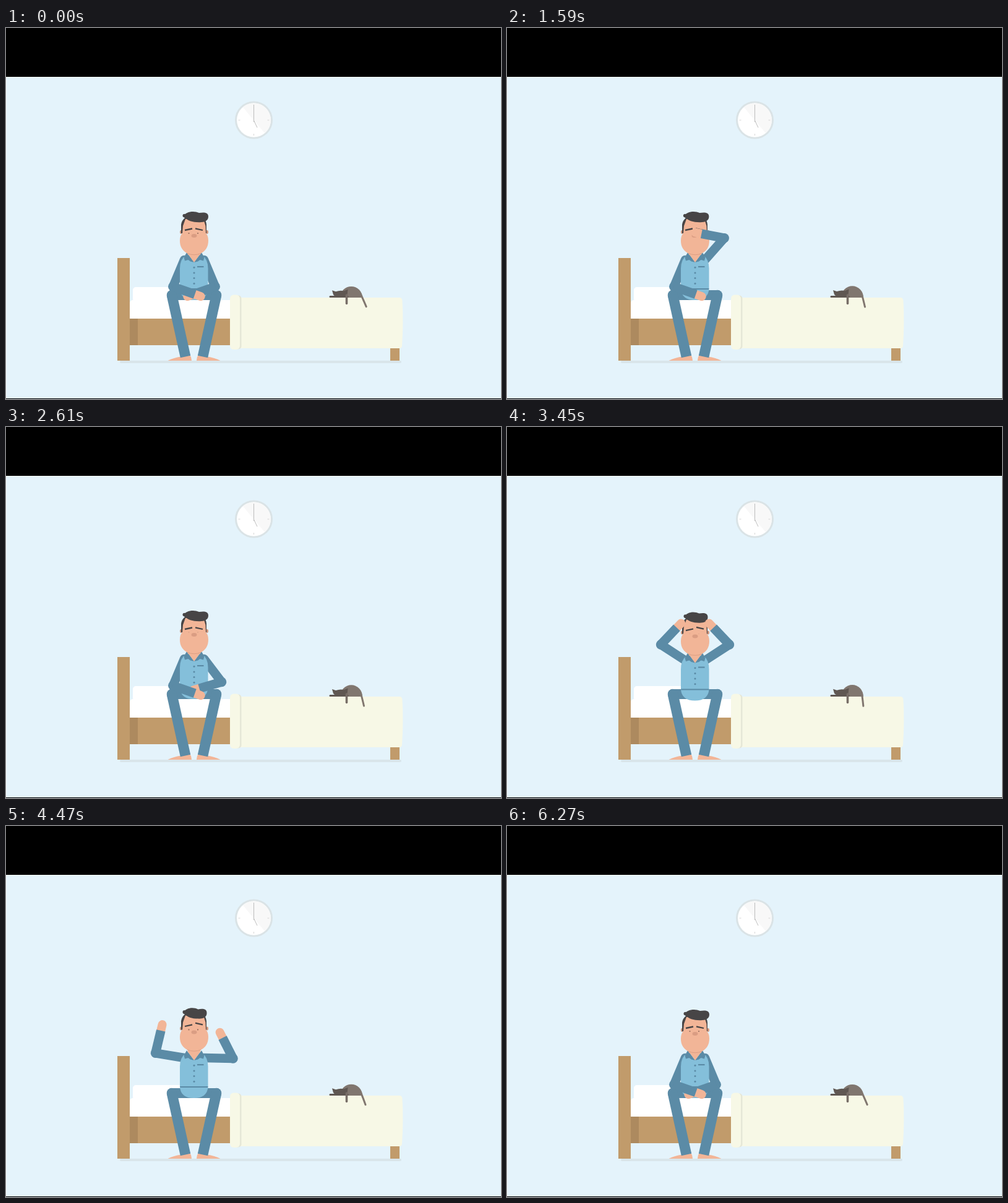
Write an HTML page with a canvas that moves like this. It is 800 by 600 pixels and loops after 6300 ms.

```html
<!DOCTYPE html>
<html lang="en">
<head>
<meta charset="utf-8">
<title>Bedtime</title>
<style>
html, body { margin: 0; width: 100%; height: 100%; overflow: hidden; background: #000; }
canvas { display: block; }
</style>
</head>
<body>
<canvas id="stage" width="800" height="600"></canvas>
<script>
const ctx = document.getElementById('stage').getContext('2d');
const LOOP = 6300, TAU = Math.PI * 2, AXIS = 304;
const NAVY = '#5b8ba6', SHIRT = '#84bfda', SKIN = '#f2b597', HAIR = '#474546';
const WOOD = '#c19b6b', SHEET = '#f7f8e6', CAT = '#80766f', CAT_DARK = '#5f5752';

// poses: upper arm and forearm angles in degrees, for the arm on the left
const REST = [112.7, 19.4], RUB = [232, -8], HOLD = [213, -46.5], STRETCH = [240, -140];

const rightArm = [[30, REST], [600, RUB], [2050, RUB], [2768, REST], [2800, REST],
  [3300, HOLD], [3650, HOLD], [4000, STRETCH], [4074, STRETCH], [4888, REST]];
const leftArm = [[2800, REST], [3300, HOLD], [3680, HOLD], [4040, STRETCH],
  [4120, STRETCH], [4934, REST]];
const rubbing = [[450, [0]], [700, [1]], [2000, [1]], [2300, [0]]];
const bodyDrop = [[2800, [0]], [3350, [2.5]], [3650, [2.5]], [4100, [0]]];
const headDrop = [[2800, [0]], [3350, [2.6]], [3650, [2.6]], [4050, [-2.6]],
  [4470, [-2.6]], [5000, [0]]];
const browLift = [[2800, [0]], [3350, [2]], [4500, [2]], [5050, [0]]];
const eyeOpen = [[60, [1]], [250, [0]], [3350, [0.15]], [3700, [0.15]], [4250, [1]],
  [5480, [1]], [5580, [0]], [5640, [0]], [5760, [1]]];

function track(keys, t) {
  if (t <= keys[0][0]) return keys[0][1];
  for (let i = 1; i < keys.length; i++) {
    const [t0, a] = keys[i - 1], [t1, b] = keys[i];
    if (t < t1) {
      const u = (t - t0) / (t1 - t0), e = u * u * (3 - 2 * u);
      return a.map((v, k) => v + (b[k] - v) * e);
    }
  }
  return keys[keys.length - 1][1];
}

function rect(x, y, w, h, color, r = 0) {
  ctx.fillStyle = color;
  ctx.beginPath();
  ctx.roundRect(x, y, w, h, r);
  ctx.fill();
}

function ellipse(x, y, rx, ry, color) {
  ctx.fillStyle = color;
  ctx.beginPath();
  ctx.ellipse(x, y, rx, ry, 0, 0, TAU);
  ctx.fill();
}

function line(x0, y0, x1, y1, width, color, cap = 'butt') {
  ctx.strokeStyle = color;
  ctx.lineWidth = width;
  ctx.lineCap = cap;
  ctx.beginPath();
  ctx.moveTo(x0, y0);
  ctx.lineTo(x1, y1);
  ctx.stroke();
}

function shape(d, color) {
  ctx.fillStyle = color;
  ctx.fill(new Path2D(d));
}

function mirrored(draw) {
  ctx.save();
  ctx.translate(2 * AXIS, 0);
  ctx.scale(-1, 1);
  draw();
  ctx.restore();
}

function both(draw) {
  draw();
  mirrored(draw);
}

function drawClock() {
  const x = 400.5, y = 149;
  ellipse(x, y, 30.5, 30.5, '#dae3e6');
  ellipse(x, y, 27.5, 27.5, '#ffffff');
  ctx.fillStyle = '#f8f8f8';
  ctx.beginPath();
  ctx.arc(x, y, 27.5, -2.27, 0.87);
  ctx.fill();
  for (let i = 0; i < 4; i++) {
    const c = Math.cos(i * TAU / 4), s = Math.sin(i * TAU / 4);
    line(x + c * 22, y + s * 22, x + c * 25, y + s * 25, 1, '#d6d6d6');
  }
  line(x, 152, x, 124, 1, '#bdbdbd');
  line(x, 149.5, 406, 161, 1, '#bdbdbd');
}

function drawRoom() {
  rect(0, 0, 800, 600, '#000');
  rect(0, 79, 800, 520, '#f6fbfe');
  rect(1, 80, 799, 519, '#e4f3fb');
  drawClock();
  rect(184, 538, 455, 4, '#d9e5ea', 2);
  rect(205, 419, 90, 24, '#fff', 5);
  rect(200, 440, 170, 32, '#fff', [5, 0, 0, 0]);
  rect(200, 470, 164, 43, WOOD);
  rect(200, 470, 13, 43, '#ad8a5f');
  rect(180, 372, 20, 166, WOOD);
  rect(621, 516, 15, 22, WOOD);
  shape('M366 436H636Q640 436 640.5 441Q642.5 476 640 514Q639.5 518 636 518H366Z', SHEET);
  rect(366, 432.5, 14.5, 87, '#e5e7d7', 5);
  rect(362, 431.5, 16, 88.5, SHEET, 6);
}

function drawCat(t) {
  const wave = Math.cos(t * TAU / 2100), top = 18.7 - wave * 0.6;
  const tip = 578.3 + 3.9 * wave;
  ctx.strokeStyle = CAT;
  ctx.lineWidth = 3;
  ctx.lineCap = 'round';
  ctx.beginPath();
  ctx.moveTo(573, 430);
  ctx.quadraticCurveTo(574.5 + wave * 0.6, 434, tip, 451 - wave * 0.4);
  ctx.stroke();
  ctx.fillStyle = CAT;
  ctx.beginPath();
  ctx.ellipse(558, 436, 18, top, 0, Math.PI, TAU);
  ctx.fill();
  line(524, 434.6, 552, 434.6, 3, CAT_DARK, 'round');
  const dy = wave * 0.3;
  ctx.save();
  ctx.translate(0, dy);
  shape('M527 424L533 426Q540 423.5 546 425L552.5 422.5L551.5 432Q547 435 540 435Q531 434 529 431Z', CAT_DARK);
  ctx.restore();
  line(550.5, 432, 550.5, 445.5, 3.6, '#776d67', 'round');
}

function drawLegs() {
  line(268, 432, 340, 432, 16, NAVY, 'round');
  both(() => {
    shape('M261.5 538Q271 533 283 531.5L297.5 529Q300 533 300 538Z', SKIN);
    ellipse(268, 432, 8.3, 8.3, NAVY);
    line(268, 432, 290, 531.5, 16.8, NAVY);
  });
}

function joints(pose, dy) {
  const [a, b] = pose.map(v => v * Math.PI / 180);
  const ex = 288 + 47 * Math.cos(a), ey = 375 + dy + 47 * Math.sin(a);
  return { dy, ex, ey, along: d => [ex + d * Math.cos(b), ey + d * Math.sin(b)] };
}

function upperArm(j) {
  line(288, 375 + j.dy, j.ex, j.ey, 14.5, NAVY, 'round');
}

function forearm(j) {
  line(...j.along(34), ...j.along(47.5), 14, SKIN, 'round');
  ellipse(j.ex, j.ey, 7.8, 7.8, NAVY);
  line(j.ex, j.ey, ...j.along(37.5), 14.8, NAVY);
}

function drawTorso(dy) {
  ctx.save();
  ctx.translate(0, dy);
  shape('M281 389Q281 374 291 367H317Q326.5 374 326.5 389V422Q325 440 303.7 440Q282.5 440 281 422Z', SHIRT);
  rect(281.3, 421, 45, 2, NAVY);
  both(() => shape('M292 363L304 379L298 377.5L294.5 375L289 376.5L287.5 371Z', NAVY));
  shape('M293 364H315L304 379Z', SKIN);
  for (let i = 0; i < 4; i++) ellipse(304, 387.2 + i * 8.7, 1.5, 1.5, NAVY);
  rect(309, 385, 10.5, 2.2, NAVY);
  ctx.restore();
}

function drawHead(t, rub) {
  const dy = track(headDrop, t)[0], lift = track(browLift, t)[0], open = track(eyeOpen, t)[0];
  const dx = -rub;
  ctx.save();
  ctx.translate(0, dy);
  rect(294, 355, 20, 12, SKIN);
  both(() => ellipse(283, 330, 2, 3, '#cf957b'));
  shape('M283 332L283 318Q285 304 304 302Q323 304 324 318V332Z', HAIR);
  shape('M285 332L286 320L290 309H319L322.5 320L323 332C328 336 328.5 350 323.5 357C315 370 293 370 284.5 357C279.5 350 280 336 285 332Z', SKIN);
  ctx.strokeStyle = '#dc9f84';
  ctx.lineWidth = 1;
  ctx.stroke(new Path2D('M293 364.6Q304 369 315 364.6'));

  ctx.save();
  ctx.translate(dx, 0);
  for (const x of [295.5, 310]) {
    if (open > 0.05) ellipse(x, 332, 1.1, 1.1 * open, '#98705f');
  }
  ellipse(304, 336, 4.5, 3, '#da9d83');
  line(289, 327 - lift * 0.2, 301, 324.5 - lift * 0.3, 2.3, HAIR);
  line(306, 324.3 - lift * 1.5, 318, 327 - lift * 1.5, 2.3, HAIR);
  ctx.restore();

  ctx.translate(286 - rub * 0.6, 0);
  ctx.scale(1 - lift * 0.03, 1);
  ctx.translate(-286, 0);
  ellipse(288.3, 303.5, 2.8, 2.8, HAIR);
  shape('M286.5 305C290 296.5 304 295 312 299C319 298 327 297.5 327 305C327 312.5 319 314.5 312 314.2C301 314 294 312 286.5 305Z', HAIR);
  ctx.restore();
}

function draw(t) {
  const rub = track(rubbing, t)[0], dy = track(bodyDrop, t)[0];
  const wobble = rub * Math.cos((t - 750) * TAU / 560);
  const [a, b] = track(rightArm, t);
  const right = joints([a + 3.5 * wobble, b + 3 * wobble], dy);
  const left = joints(track(leftArm, t), dy);
  drawRoom();
  drawCat(t);
  drawLegs();
  upperArm(left);
  mirrored(() => upperArm(right));
  drawTorso(dy);
  drawHead(t, rub);
  mirrored(() => forearm(right));
  forearm(left);
}

const start = performance.now();
function tick() {
  draw((performance.now() - start) % LOOP);
  requestAnimationFrame(tick);
}
tick();
</script>
</body>
</html>
```
